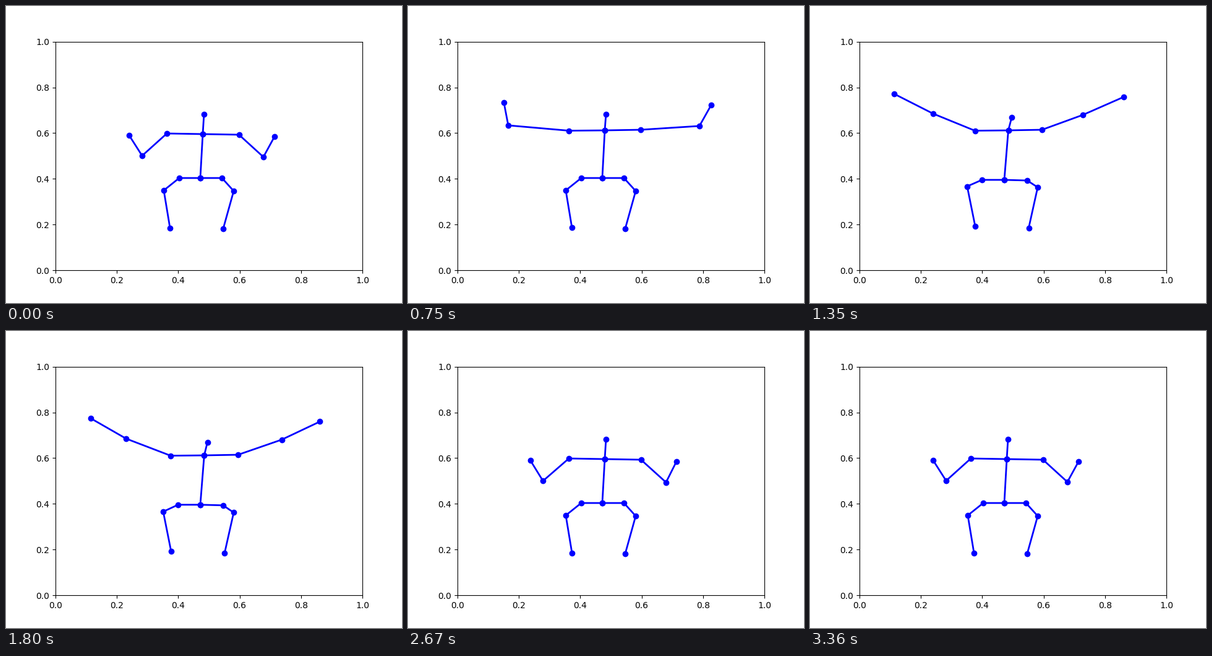
A matplotlib script that plays this animation: 640 by 480 pixels, repeating every 3390 ms.

```python
import numpy as np
import matplotlib.pyplot as plt
from matplotlib.animation import FuncAnimation

W, H = 640, 480
STEP, FRAMES = 30, 113

# Body poses in stage pixels: head, neck, shoulders, pelvis,
# then hip, knee and foot of each leg
LOW = np.array([(320, 174.5), (318, 207), (260, 206), (376.5, 208), (314, 278),
                (280, 278), (255, 298), (265, 358.5),
                (349, 278), (368, 299), (351, 360)])
HIGH = np.array([(326, 180), (320.5, 201), (266.5, 201.5), (375, 200), (314, 281),
                 (278, 281), (254, 291.5), (267, 356),
                 (351, 282), (368, 293), (353.5, 358.5)])

# Points each arm joint passes on its way up
ARM_PATHS = [
    [(220, 242), (178, 228), (162, 193), (199, 174)],  # left elbow
    [(199, 209), (174, 192), (155, 156), (136, 142)],  # left hand
    [(416, 244), (449, 232), (471, 194), (441, 176)],  # right elbow
    [(434, 211), (451, 195), (490, 160), (507, 147)],  # right hand
]
ARM_CURVES = [np.polyfit(range(4), path, 3) for path in ARM_PATHS]

# Body joints are 0-10, arm joints 11-14
CHAINS = [(0, 1, 4), (12, 11, 2, 1, 3, 13, 14), (7, 6, 5, 4, 8, 9, 10)]


def ramp(x):
    return np.clip(x, 0, 1)


def ease(x):
    return x * x * (3 - 2 * x)


def lift(ms):
    """Height of the arms, 0 (rest) to 3 (fully raised)."""
    rise = ease(ramp((ms - 75) / 1100))
    fall = ease(ramp((ms - 1760) / 1000) ** 0.75)
    return 3 * (rise - fall)


def pose(u):
    """All joints at lift u; neck and shoulders rise before the rest."""
    weight = np.full(LOW.shape, ramp(u - 2))
    weight[1:4, 1] = ramp(u - 1)
    body = LOW + weight * (HIGH - LOW)
    arms = [u ** np.arange(3, -1, -1) @ curve for curve in ARM_CURVES]
    return np.vstack([body, arms])


def to_axes(points):
    x = (points[:, 0] - 0.125 * W) / (0.775 * W)
    y = (0.89 * H - points[:, 1]) / (0.77 * H)
    return np.column_stack([x, y])


fig, ax = plt.subplots(figsize=(W / 100, H / 100), dpi=100)
fig.subplots_adjust(left=0.125, right=0.9, bottom=0.11, top=0.88)
ax.set_xlim(0, 1)
ax.set_ylim(0, 1)
lines = [ax.plot([], [], "o-", color="#0000ff", lw=2)[0] for _ in CHAINS]


def update(i):
    joints = to_axes(pose(lift(i * STEP)))
    for line, chain in zip(lines, CHAINS):
        line.set_data(*joints[list(chain)].T)
    return lines


anim = FuncAnimation(fig, update, frames=FRAMES, interval=STEP,
                     repeat=True, repeat_delay=0)
plt.show()
```
